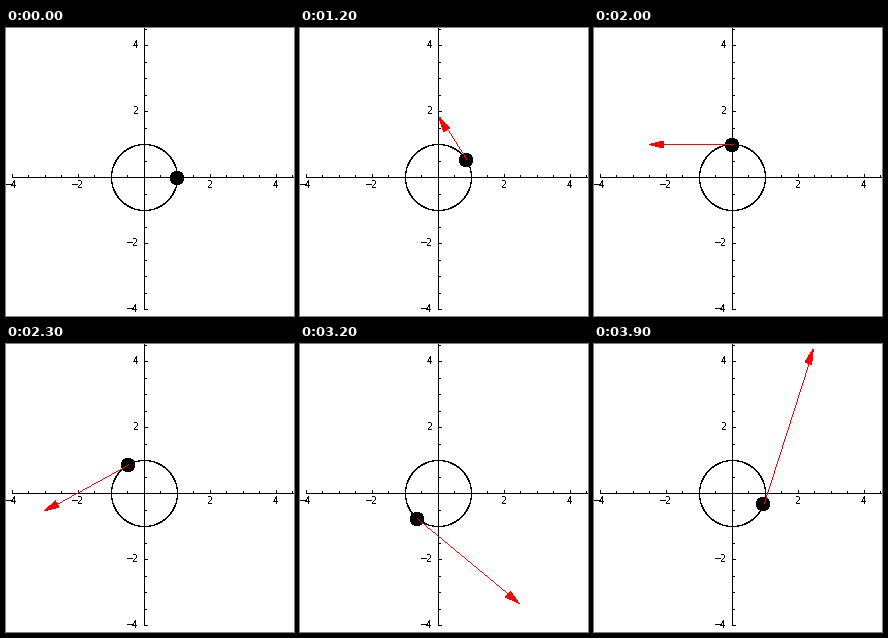
A matplotlib script that plays this animation: 288x288 px, repeating every 4 s.

```python
import numpy as np
import matplotlib.pyplot as plt
from matplotlib.animation import FuncAnimation
from matplotlib.patches import Circle, Polygon, Rectangle

plt.rcParams["text.antialiased"] = False

SIZE = 288
FRAMES = 40
UNIT = 33                          # pixels per axis unit
ORIGIN = np.array([138, 149.5])
HEAD_LENGTH, HEAD_HALF = 14, 3.5
T_END = np.sqrt(2 * np.pi)         # angle = t**2 completes one turn

fig = plt.figure(figsize=(SIZE / 72, SIZE / 72), dpi=72, facecolor="white")
ax = fig.add_axes([0, 0, 1, 1])
ax.set_xlim(0, SIZE)
ax.set_ylim(SIZE, 0)
ax.axis("off")


def to_px(point):
    return ORIGIN + UNIT * np.asarray(point) * [1, -1]


def bar(x, y, w, h):
    ax.add_patch(Rectangle((x, y), w, h, fc="black", lw=0, antialiased=False))


def draw_axes():
    ox, oy = np.floor(ORIGIN)
    bar(6, oy, SIZE - 6, 1)
    bar(ox, 0, 1, 282)
    for value in np.arange(-4, 4.6, 0.5):
        if value == 0:
            continue
        major = value % 2 == 0
        length = 3 if major else 2
        px, py = np.floor(to_px((value, value)))
        bar(px, oy - length, 1, length + 1)
        bar(ox, py, length + 1, 1)
        if major:
            label = f"{value:.0f}".replace("-", "\N{MINUS SIGN}")
            style = dict(family="DejaVu Sans Mono", size=10, va="baseline")
            ax.text(px, oy + 11, label, ha="center", **style)
            ax.text(ox - 5, py + 3, label, ha="right", **style)


def line_pixels(start, end):
    """Centres of the pixels on a one pixel wide line."""
    count = int(np.abs(end - start).max()) + 2
    points = np.linspace(start, end, count)
    return np.floor(points).T + 0.5


draw_axes()
ax.add_patch(Circle(ORIGIN + [0.5, 0], UNIT, fill=False, ec="black", lw=0.2,
                    antialiased=False))
ball = ax.add_patch(Circle(ORIGIN, 6.6, fc="black", lw=0, antialiased=False,
                           zorder=3))
shaft, = ax.plot([], [], ",", color="red", zorder=4)
head = ax.add_patch(Polygon(np.zeros((3, 2)), fc="red", lw=0,
                            antialiased=False, zorder=4))
plot_area = Rectangle((0, 0), 287, SIZE, transform=ax.transData)
for part in (shaft, head):
    part.set_clip_path(plot_area)


def update(frame):
    t = T_END * frame / FRAMES
    angle, speed = t ** 2, 2 * t
    pos = np.array([np.cos(angle), np.sin(angle)])
    heading = np.array([-pos[1], pos[0]])
    start, tip = to_px(pos), to_px(pos + speed * heading)
    ball.center = np.floor(start + 0.5)

    along = heading * [1, -1]
    across = np.array([-along[1], along[0]])
    base = tip - HEAD_LENGTH * along
    shaft.set_data(*line_pixels(start, tip))
    head.set_xy([tip, base + HEAD_HALF * across, base - HEAD_HALF * across])
    for part in (shaft, head):
        part.set_visible(frame > 0)
    return ball, shaft, head


anim = FuncAnimation(fig, update, frames=FRAMES, interval=100, repeat=True,
                     repeat_delay=0)
plt.show()
```
